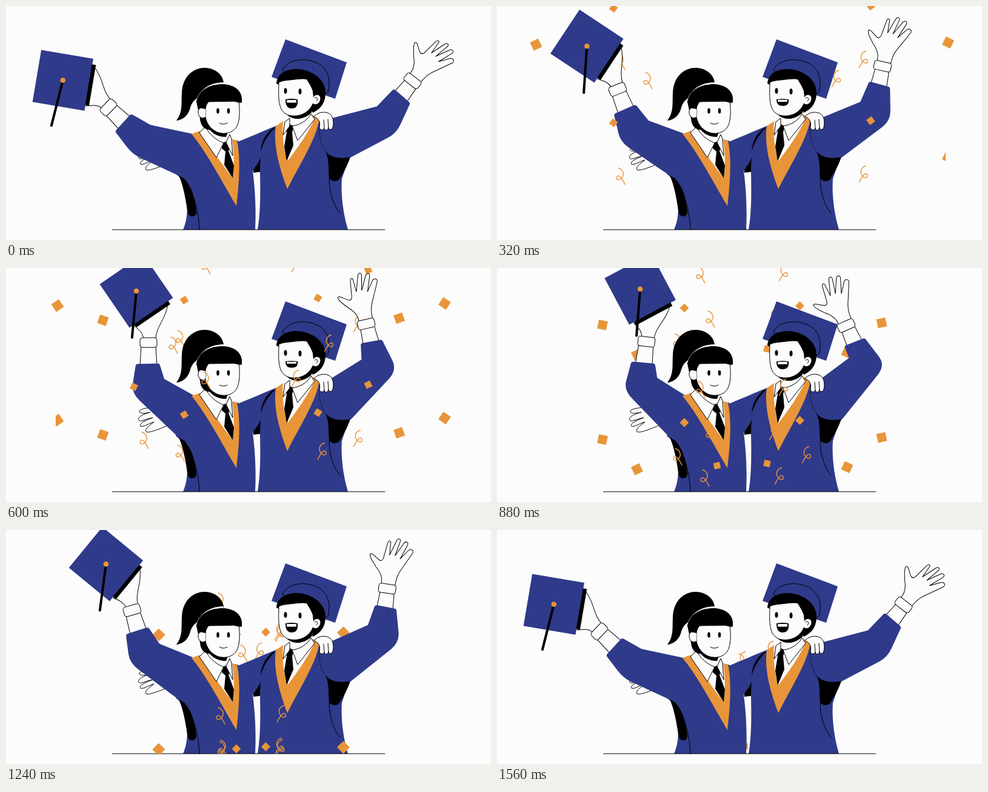
An HTML page for the animation above (1.6 s loop, 800 by 386 pixels).

```html
<!DOCTYPE html>
<html lang="en">
<head>
<meta charset="utf-8">
<title>Graduates</title>
<style>
  html, body { margin: 0; width: 100%; height: 100%; overflow: hidden; background: #fcfcfc; }
  svg { display: block; width: 800px; height: 386px; }
  .blue { fill: #2f3a8a; }
  .gold { fill: #e8953a; }
  .skin { fill: #fcfcfc; stroke: #000; stroke-width: 1; stroke-linejoin: round; }
  .line { fill: none; stroke: #000; stroke-width: 1; stroke-linecap: round; }
  .sleeve { fill: #2f3a8a; stroke: #2f3a8a; stroke-width: 8; stroke-linejoin: round; }
  .curl { fill: none; stroke: #e8953a; stroke-width: 1.4; stroke-linecap: round; }
</style>
</head>
<body>
<svg viewBox="0 0 800 386">
  <clipPath id="backClip"><rect width="800" height="369"/></clipPath>
  <clipPath id="frontClip"><rect x="82" width="658" height="369"/></clipPath>
  <g clip-path="url(#backClip)"><g id="back"></g></g>

  <!-- arms around each other -->
  <path class="skin" d="M246 230C235 230 222 232 220 236C219 241 228 240 238 238C225 241 216 247 219 251C222 255 232 248 242 247C228 252 219 257 222 261C226 263 236 256 244 254C236 260 228 266 231 270C234 273 252 266 264 261L290 250Z"/>
  <path d="M405 235H425V273L408 275Z"/>
  <path class="blue" d="M375 227C400 217 425 206 447 197L424 240C420 246 420 255 412 264L407 272L380 280Z"/>

  <!-- her raised arm -->
  <g id="leftArm">
    <path class="skin" d="M221 162L223 128H247L249 162Z"/>
    <path class="skin" d="M227 116C224 104 218 101 211 95L267 58C265 82 247 98 247 116Z"/>
    <rect class="skin" x="221" y="115" width="28" height="16" rx="4"/>
    <g transform="translate(215 38) rotate(55.6)">
      <rect class="blue" x="-43.5" y="-43.5" width="87" height="87"/>
      <rect x="43" y="-34" width="6.5" height="68"/>
    </g>
  </g>
  <line id="tassel" stroke="#000" stroke-width="4" stroke-linecap="round"/>
  <circle id="button" class="gold" r="4.3"/>
  <path id="leftSleeve" class="sleeve"/>

  <!-- her gown -->
  <path class="blue" d="M306 211L280 277L286 282C297 305 305 340 292 369H411C413 330 410 295 407 272L400 235L382 222Z"/>
  <path d="M285 279C294 300 297 325 300 342C303 350 314 348 314 340C312 315 306 298 294 285Z"/>
  <path class="line" d="M293 284C311 310 318 340 319 369"/>
  <path class="gold" d="M306 211L320 206L374 220L381 222C387 248 385 290 380 330C352 282 330 240 306 211Z"/>
  <path fill="#fcfcfc" d="M320 207L330 196L368 212L373 219C376 240 377 262 374 284C360 266 338 235 320 207Z"/>
  <path d="M357 226L364 223L371 231L367 239L376 263L374 284L360 262L362 240L356 235Z"/>
  <path class="skin" d="M329 199L319 209L347 250L359 226C347 221 336 213 329 199Z"/>
  <path class="skin" d="M369 212L372 219L374 247L363 225Z"/>

  <!-- her head -->
  <path d="M281 189C292 175 289 160 290 144C291 115 310 102 327 102C344 102 357 112 359 126C338 126 322 136 315 152C308 157 305 163 303 171C299 182 291 188 281 189Z"/>
  <path d="M314 158C318 136 340 128 360 129C381 131 391 143 389 159L350 165L340 204C328 206 321 198 320 186Z"/>
  <path d="M331 195L366 208L363 216C348 216 336 209 331 195Z"/>
  <path class="skin" d="M329 158L384 157C386 172 386 190 380 200C374 209 362 212 351 209C339 205 332 196 329 184Z"/>
  <path class="skin" d="M329 170C324 165 316 168 317 176C318 184 324 187 329 183"/>
  <path d="M314 157C323 140 345 130 362 130C380 131 390 143 389 159C383 162 370 153 352 153C338 152 332 157 329 170L319 168Z"/>
  <g id="herEyes"><ellipse cx="349.5" cy="173" rx="2.3" ry="4.5"/><ellipse cx="367" cy="173" rx="2.3" ry="4.5"/></g>
  <path class="line" d="M352 193Q358 197 365 193"/>

  <!-- his raised arm -->
  <g id="rightArm">
    <path class="skin" d="M603 130L605 98H628L630 130Z"/>
    <path class="skin" d="M605 87C606 76 601 68 592 60C588 54 580 48 580 41C582 37 588 44 597 49C601 50 603 46 603 42L606 20C607 13 612 14 611 20L612 38L620 14C622 7 628 9 626 15L621 38L632 17C635 10 641 13 639 18L630 42L642 26C646 22 651 25 649 30L637 54C631 65 628 72 628 87Z"/>
    <rect class="skin" x="601.5" y="86" width="28.5" height="15" rx="4"/>
  </g>

  <!-- his cap, gown and head -->
  <path class="blue" d="M461 55L562 93L543 153L438 117Z"/>
  <path id="rightSleeve" class="sleeve"/>
  <path class="blue" d="M445 198C424 215 419 237 419 275C420 320 419 345 415 369H564C557 345 552 315 554 285L566 250L545 186L517 182Z"/>
  <path d="M442 200C429 209 421 223 420 240C425 224 432 212 443 202Z"/>
  <path d="M527 240C538 252 554 252 568 249C561 270 553 278 551 284C547 291 536 290 533 284C531 270 534 255 527 240Z"/>
  <path class="line" d="M533 284C533 310 541 330 551 342"/>
  <path class="line" opacity=".5" d="M517 200C516 220 521 234 529 242"/>
  <path class="gold" d="M445 198L457 190L507 180L517 183C515 215 482 265 464 302C448 260 441 225 445 198Z"/>
  <path fill="#fcfcfc" d="M457 191L470 182L500 176L509 185C500 208 478 238 464 256C459 240 455 215 457 191Z"/>
  <path d="M461 199L468 195L475 198L472 208L474 230L463 256L459 232L463 208Z"/>
  <path class="skin" d="M468 185L460 191L457 213L468 198Z"/>
  <path class="skin" d="M503 178L509 187L481 222L472 198C485 196 496 190 503 178Z"/>
  <path class="skin" d="M508 183C512 176 525 173 532 177C540 180 541 192 539 200C537 206 532 204 532 200C531 206 525 206 525 201C524 206 517 205 517 200C519 192 516 185 508 183Z"/>
  <path class="line" d="M532 200L531 187M525 201L524 188"/>
  <path class="blue" stroke="#000" d="M456 106C463 89 490 84 511 93C530 101 537 120 531 142L520 150Z"/>
  <path d="M446 128C447 112 462 103 482 104C507 106 527 122 527 143C527 160 519 170 506 176L490 150Z"/>
  <path d="M464 180L505 168L504 176C492 187 476 190 464 180Z"/>
  <path class="skin" d="M450 124C450 140 448 157 454 170C460 180 469 182 480 181C494 179 504 170 508 156L506 135L495 119Z"/>
  <path d="M446 128C452 108 478 106 495 111C510 116 520 128 520 146L508 153C508 140 502 131 496 121C478 119 462 121 446 128Z"/>
  <path class="skin" d="M507 150C510 144 519 145 519 153C518 161 511 165 506 161"/>
  <path class="line" d="M509 152C513 149 516 153 512 157"/>
  <ellipse cx="461" cy="140" rx="2.5" ry="4.7"/><ellipse cx="485" cy="141" rx="2.5" ry="4.7"/>
  <g id="mouth">
    <path d="M461 154Q471 152 481 154C482 165 478 169 471 169C463 169 461 162 461 154Z"/>
    <rect x="463" y="155" width="16" height="4.5" rx="1" fill="#fcfcfc"/>
  </g>
  <path class="line" d="M175.500 369H625"/>
  <g clip-path="url(#frontClip)"><g id="front"></g></g>
</svg>
<script>
const LOOP = 1600, STEP = 40;
const $ = id => document.getElementById(id);

// Monotone cubic interpolation through (times, values).
function curve(times, values, t) {
  const last = times.length - 1;
  if (t <= times[0]) return values[0];
  if (t >= times[last]) return values[last];
  const slope = i => (values[i + 1] - values[i]) / (times[i + 1] - times[i]);
  const tangent = i => {
    if (i === 0 || i === last) return 0;
    const a = slope(i - 1), b = slope(i);
    return a * b <= 0 ? 0 : 2 * a * b / (a + b);
  };
  let i = 0;
  while (times[i + 1] < t) i++;
  const h = times[i + 1] - times[i], u = (t - times[i]) / h, v = 1 - u;
  return v * v * (1 + 2 * u) * values[i] + u * u * (3 - 2 * u) * values[i + 1]
       + h * u * v * (v * tangent(i) - u * tangent(i + 1));
}

const poseTimes = [0, 160, 440, 600, 890, 1240, 1560];
const pose = {
  left: [0, 8, 36, 46, 52.5, 29.8, 0],
  right: [0, 9.5, 38, 51, 62, 30, 0],
  tassel: [14.2, 2.2, 5.1, 5.3, 4.5, 7.5, 14.2],
  mouth: [1, .87, .66, .7, .87, 1, 1]
};

// Confetti flies in from the side and drifts down; each path is used twice, the second time earlier.
const flightTimes = [230, 390, 440, 600, 880, 1110, 1240, 1560, 1790];
const flights = [
  { size: 15, spin: s => 45 - .16 * (s - 670),
    x: [-130, -25, 9, 85, 174, 231, 252, 300, 320], y: [130, 90, 76, 62, 94, 143, 173, 275, 380] },
  { size: 10.5, spin: s => 45 - .25 * (s - 880),
    x: [-120, 103, 143, 211, 309, 363, 380, 398, 400], y: [90, 11, 0, 7, 66, 137, 172, 270, 360] },
  { x: [-110, 78, 126, 228, 298, 343, 358, 403, 430], y: [110, 88, 86, 95, 122, 157, 171, 217, 262] },
  { x: [-130, 88, 149, 276, 336, 352, 354, 357, 358], y: [40, -58, -71, -62, 11, 84, 117, 200, 300] }
];
const LEAD = 230, LOWER = 189;
const curl = 'M-4 -13C4 -11 7 -2 1 4C-4 9 -9 5 -6 1C-3 -3 2 4 7 14';

function add(parent, name, attrs) {
  const node = document.createElementNS('http://www.w3.org/2000/svg', name);
  for (const key in attrs) node.setAttribute(key, attrs[key]);
  return parent.appendChild(node);
}

const pieces = [];
for (const [layer, drop] of [['back', 0], ['front', LOWER]])
  for (const side of ['', 'translate(808.5 -3.5) scale(-1 1)']) {
    const group = add($(layer), 'g', { transform: `${side} translate(0 ${drop})` });
    for (const flight of flights)
      for (const lead of [0, LEAD]) {
        const s = flight.size;
        const node = s
          ? add(group, 'rect', { class: 'gold', x: -s / 2, y: -s / 2, width: s, height: s })
          : add(group, 'path', { class: 'curl', d: curl });
        pieces.push({ node, flight, lead });
      }
  }

function turn([x, y], [cx, cy], degrees) {
  const a = degrees * Math.PI / 180, c = Math.cos(a), s = Math.sin(a);
  return [cx + (x - cx) * c - (y - cy) * s, cy + (x - cx) * s + (y - cy) * c];
}
const mix = (a, b, k) => a.map((v, i) => v + (b[i] - v) * k);

// Sleeve outline: armpit, rounded elbow, cuff, inner bend, shoulder.
function sleeve(id, armpit, elbow, cuffOut, cuffIn, bend, shoulder) {
  $(id).setAttribute('d', `M${armpit}L${mix(elbow, armpit, .16)}Q${elbow} ${mix(elbow, cuffOut, .3)}`
    + `L${cuffOut}L${cuffIn}L${bend}L${shoulder}Z`);
}

const leftElbow = [254, 223], rightElbow = [599.5, 188], button = [215, 38];

function draw(t) {
  const now = name => curve(poseTimes, pose[name], t);
  const left = now('left'), right = now('right');

  $('leftArm').setAttribute('transform', `rotate(${left - 46} ${leftElbow})`);
  const l = p => turn(p, leftElbow, left);
  sleeve('leftSleeve', [288, 277], l([211, 241]), l([185, 207]), l([207, 183]),
    [237 + .45 * left, 200 - .31 * left], [312, 216]);

  $('rightArm').setAttribute('transform', `rotate(${38 - right} ${rightElbow})`);
  const r = p => turn(p, rightElbow, -right);
  sleeve('rightSleeve', [567, 246], r([641, 207]), r([662, 161]), r([640, 142]),
    [614 - .46 * right, 169 - .31 * right], [530, 191]);

  const [bx, by] = turn(button, leftElbow, left - 46);
  const [ex, ey] = turn([bx, by + 77], [bx, by], now('tassel'));
  const tassel = { x1: bx, y1: by, x2: ex, y2: ey };
  for (const key in tassel) $('tassel').setAttribute(key, tassel[key]);
  $('button').setAttribute('transform', `translate(${bx} ${by})`);

  const squash = (id, y, k) => $(id).setAttribute('transform', `translate(0 ${y * (1 - k)}) scale(1 ${k})`);
  squash('mouth', 154, now('mouth'));
  squash('herEyes', 173, curve([360, 440, 520], [1, .5, 1], t));

  for (const { node, flight, lead } of pieces) {
    const s = t + lead;
    const x = curve(flightTimes, flight.x, s), y = curve(flightTimes, flight.y, s);
    node.setAttribute('transform', `translate(${x} ${y}) rotate(${flight.spin ? flight.spin(s) : 0})`);
  }
}

function tick() {
  draw(Math.floor(performance.now() % LOOP / STEP) * STEP);
  requestAnimationFrame(tick);
}
tick();
</script>
</body>
</html>
```
